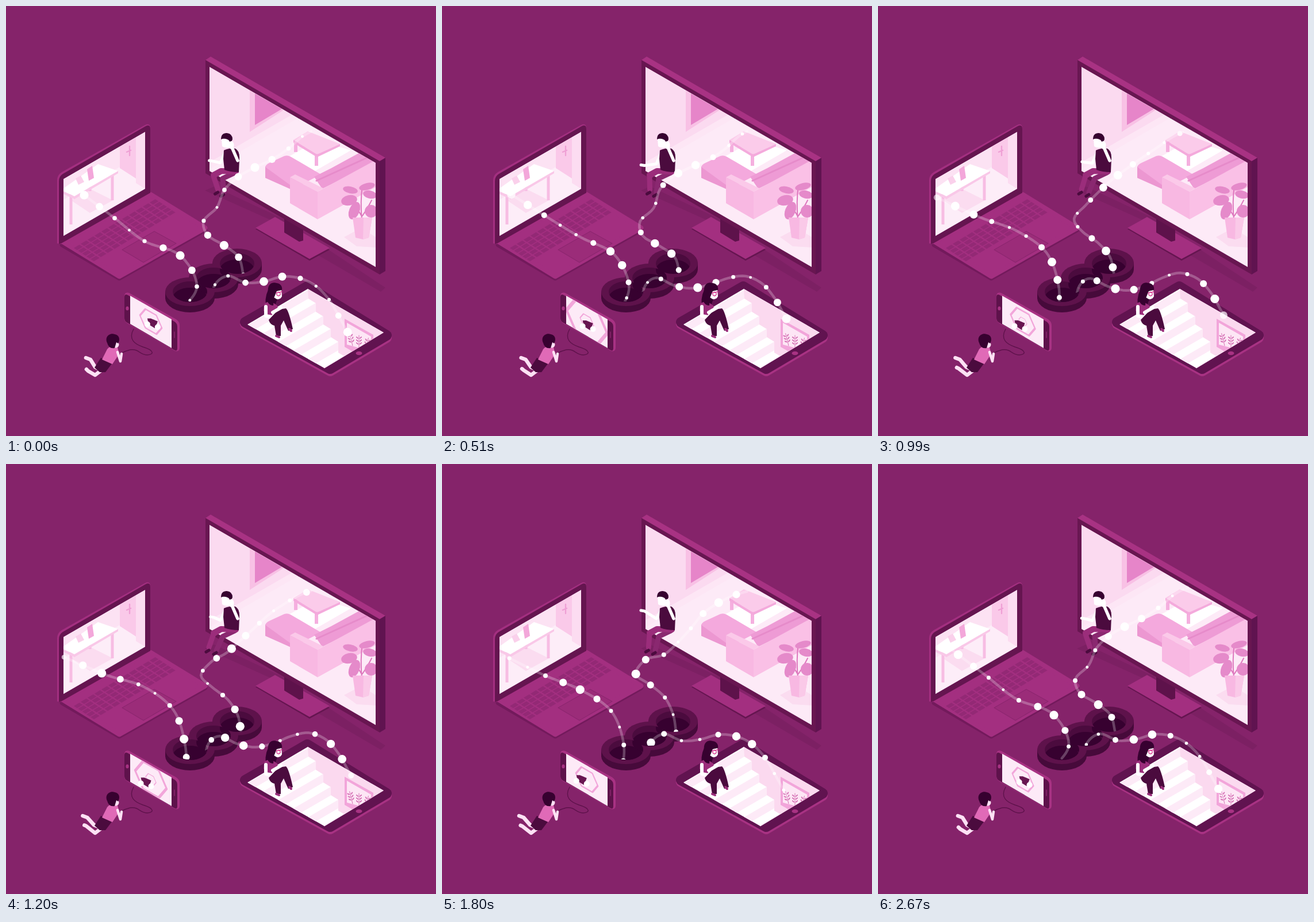
Write an HTML page that moves like this. It is 748 px wide and 748 px high and loops after 2.7 s.

```html
<!DOCTYPE html>
<html lang="en">
<head>
<meta charset="utf-8">
<title>Connected rooms</title>
<style>
html, body { margin: 0; width: 100%; height: 100%; overflow: hidden; background: #85236a; }
svg { display: block; width: 100vw; height: 100vh; }
</style>
</head>
<body>
<svg viewBox="0 0 748 748" stroke-linejoin="round" stroke-linecap="round">
<defs>
  <g id="outer"><ellipse cx="320" cy="497" rx="43" ry="25"/><ellipse cx="361" cy="473" rx="43" ry="25"/><ellipse cx="402" cy="447" rx="43" ry="25"/></g>
  <g id="inner"><ellipse cx="320" cy="497" rx="30" ry="18"/><ellipse cx="361" cy="473" rx="30" ry="18"/><ellipse cx="402" cy="448" rx="30" ry="18"/></g>
  <clipPath id="hole"><ellipse cx="320" cy="497" rx="30" ry="18"/><ellipse cx="361" cy="473" rx="30" ry="18"/><ellipse cx="402" cy="448" rx="30" ry="18"/></clipPath>
  <clipPath id="cut0"><rect width="748" height="490"/><ellipse cx="320" cy="497" rx="31" ry="17"/></clipPath>
  <clipPath id="cut1"><rect width="748" height="446"/><ellipse cx="402" cy="448" rx="31" ry="18"/></clipPath>
  <clipPath id="cut2"><rect width="748" height="474"/><rect x="386" width="362" height="748"/><ellipse cx="361" cy="473" rx="30" ry="17"/><ellipse cx="324" cy="490" rx="31" ry="12"/></clipPath>
  <clipPath id="tv"><polygon points="354,106 643,273 643,454 354,287"/></clipPath>
  <clipPath id="lap"><polygon points="100,301 242,219 242,318 100,400"/></clipPath>
  <clipPath id="pad"><polygon points="420,554 525,492 657,568 554,630"/></clipPath>
  <clipPath id="phone"><polygon points="216,504 288,545 288,595 216,553"/></clipPath>
</defs>

<rect width="748" height="748" fill="#85236a"/>
<g fill="#7c2063">
  <polygon points="346,321 362,314 490,374 482,382"/>
  <polygon points="528,402 660,490 652,497 520,420"/>
</g>

<!-- laptop -->
<polygon points="98,415 251,331 346,389 197,473" fill="#731a5c" stroke="#731a5c" stroke-width="9"/>
<polygon points="99,410 251,328 346,386 197,470" fill="#a32f80" stroke="#a32f80" stroke-width="9"/>
<g id="keys" fill="#932975"/>
<polygon points="202,424 258,392 296,413 239,446" fill="#9b2c79" stroke="#8c266f" stroke-width="1.2"/>
<path d="M89 413V303Q89 294 97 289L242 207Q251 203 251 213V325L96 414Z" fill="#a32f80"/>
<path d="M92 414V305Q92 296 99 292L243 209Q251 205 251 214V325L96 413Z" fill="#651550"/>
<g clip-path="url(#lap)">
  <rect x="95" y="210" width="150" height="195" fill="#fdedf8"/>
  <polygon points="100,301 198,244 198,280 100,337" fill="#fce2f3"/>
  <polygon points="198,244 226,228 226,300 198,282" fill="#fac9e9"/>
  <polygon points="226,228 242,219 242,318 226,308" fill="#fcdcf1"/>
  <polygon points="113,338 146,318 186,338 146,360" fill="#fbdcf0"/>
  <path d="M113 326V380M185 294V338M146 310V322" stroke="#f7bde3" stroke-width="5" stroke-linecap="butt"/>
  <polygon points="96,320 160,275 195,287 119,331" fill="#fff"/>
  <path d="M98 322L119 331 195 287V291L119 336 98 326Z" fill="#f9c8e8"/>
  <polygon points="141,284 150,278 153,299 144,304" fill="#f3a7da"/>
  <polygon points="121,300 130,295 136,306 126,311" fill="#fad0eb"/>
  <path d="M215 244V260M210 254L217 251" stroke="#efa0d5" stroke-width="2.4"/>
</g>

<!-- monitor -->
<polygon points="434,388 468,370 563,424 528,443" fill="#651550"/>
<polygon points="434,386 468,367 563,421 528,440" fill="#a32f80"/>
<polygon points="484,365 517,384 517,408 510,410 484,394" fill="#5e124b"/>
<polygon points="347,94 356,88 660,264 650,270" fill="#a83283"/>
<polygon points="650,270 660,264 660,461 650,467" fill="#601350"/>
<polygon points="347,94 650,270 650,467 347,291" fill="#681651"/>
<g clip-path="url(#tv)">
  <rect x="350" y="100" width="300" height="360" fill="#fdeaf7"/>
  <polygon points="354,106 498,189 354,272" fill="#fbdaf0"/>
  <polygon points="354,272 498,189 508,195 354,284" fill="#fde6f5"/>
  <polygon points="424,147 483,181 424,219" fill="#f8c1e5"/>
  <polygon points="433,152 480,179 433,207" fill="#e685c9"/>
  <polygon points="492,262 541,234 600,251 534,289" fill="#fff"/>
  <path d="M504 235V254M540 257V278" stroke="#f5afdf" stroke-width="6" stroke-linecap="butt"/>
  <polygon points="500,233 525,218 581,240 541,258" fill="#fbcbea"/>
  <path d="M500 233L541 258 581 240V244L541 263 500 238Z" fill="#f4aadc"/>
  <polygon points="451,279 498,303 498,320 451,299" fill="#ec97d1"/>
  <path d="M451 280Q452 276 458 273L484 261Q490 259 495 262L548 293 502 317Z" fill="#f4a9dd"/>
  <polygon points="536,297 566,282 632,246 643,252 643,272 550,318" fill="#ee9bd5"/>
  <path d="M540 304L643 257" stroke="#e68bca" stroke-width="3"/>
  <polygon points="494,298 503,293 552,317 542,323" fill="#fbc9e9"/>
  <polygon points="542,323 643,268 643,315 542,371" fill="#fac0e6"/>
  <polygon points="494,298 542,323 542,371 494,343" fill="#f8b8e2"/>
  <polygon points="588,402 618,386 643,402 643,420 610,418" fill="#fbdcf0"/>
  <path d="M619 372Q616 340 620 312M619 366Q610 350 600 338M620 365Q630 350 636 338" stroke="#de78be" stroke-width="2" fill="none"/>
  <g fill="#e58aca">
    <ellipse cx="628" cy="314" rx="14" ry="6" transform="rotate(-14 628 314)"/>
    <ellipse cx="599" cy="320" rx="13" ry="6" transform="rotate(12 599 320)"/>
    <ellipse cx="597" cy="338" rx="14" ry="9" transform="rotate(-12 597 338)"/>
    <ellipse cx="633" cy="328" rx="12" ry="7" transform="rotate(12 633 328)"/>
    <ellipse cx="606" cy="356" rx="9" ry="16" transform="rotate(22 606 356)"/>
    <ellipse cx="635" cy="357" rx="11" ry="11"/>
  </g>
  <polygon points="603,368 637,368 631,403 621,406 608,403" fill="#f8b8e2"/>
  <polygon points="622,368 637,368 631,403 621,406" fill="#fac9e8"/>
</g>

<!-- linked holes -->
<g fill="#470a3b"><use href="#outer" y="11"/><use href="#outer" y="8"/><use href="#outer" y="5"/><use href="#outer" y="2"/></g>
<use href="#outer" fill="#5e124b"/>
<use href="#inner" fill="#4b0b3e"/>
<g clip-path="url(#hole)"><use href="#inner" y="11" fill="#370130"/></g>

<!-- tablet -->
<polygon points="416,553 524,490 662,577 564,635" fill="#a83283" stroke="#a83283" stroke-width="18"/>
<polygon points="416,550 524,488 662,573 564,631" fill="#611350" stroke="#611350" stroke-width="18"/>
<g clip-path="url(#pad)">
  <rect x="410" y="485" width="255" height="150" fill="#fff"/>
  <g id="steps" fill="#fdeaf7"/>
  <polygon points="525,492 657,568 590,610 578,603 578,584 565,576 565,562 552,554 552,540 539,532 539,517 526,509" fill="#fbd9ef"/>
  <polygon points="589,544 639,572 639,597 612,606 589,593" fill="#f2a5da"/>
  <polygon points="593,551 635,575 635,600 593,589" fill="#fde6f5"/>
  <g id="sprigs" fill="#d673b6" stroke="#d673b6"/>
</g>
<ellipse cx="614" cy="604" rx="5.5" ry="3.3" fill="#a83283"/>

<!-- phone -->
<path d="M206 505Q206 497 214 499L296 545Q302 549 302 556V594Q302 602 294 600L211 552Q206 549 206 543Z" fill="#a83283"/>
<path d="M206 507Q206 500 212 503L293 549Q298 552 298 558V595Q298 602 292 598L211 551Q206 548 206 543Z" fill="#5e124b"/>
<ellipse cx="211" cy="526" rx="2.6" ry="3.6" fill="#a83283"/>
<path d="M293 567V577" stroke="#8c266f" stroke-width="1.5"/>
<g clip-path="url(#phone)">
  <rect x="210" y="500" width="82" height="100" fill="#fdeaf7"/>
  <g id="rings" transform="matrix(1 .57 0 1 252 549)" fill="none" stroke="#f2a6da"/>
  <g id="player">
    <polygon points="-9,-6 -3,-6 2,-4 9,-1 7,5 4,11 -4,6 -7,3" fill="#681651"/>
    <circle cx="-9" cy="4" r="5" fill="#fff"/><circle cx="9" cy="9" r="5" fill="#fff"/>
  </g>
</g>

<!-- child -->
<path d="M222 562C212 580 224 588 238 593C258 599 258 606 246 607C232 607 232 596 216 598Q208 600 200 604" stroke="#5e124b" stroke-width="1.4" fill="none"/>
<g fill="none" stroke="#fde1f4" stroke-width="6.5"><path id="kickB"/><path id="kickA"/></g>
<polygon points="165,612 185,621 173,637 163,637 154,629" fill="#4b0b3e"/>
<path d="M176 597Q184 588 194 594L197 605 185 623 167 615Z" fill="#e06ab7"/>
<path d="M194 602L199 618 201 605" stroke="#fde1f4" stroke-width="4.5" fill="none"/>
<circle cx="191" cy="589" r="5.5" fill="#fde1f4"/>
<path d="M176 586C171 575 181 568 189 571C197 572 199 580 195 587L192 585 189 595Q179 597 176 586Z" fill="#370130"/>

<!-- seated man -->
<g fill="none" stroke-width="9"><path id="legB" stroke="#8a2870"/><path id="legA" stroke="#9b2d7b"/></g>
<g fill="none" stroke="#4b0b3e" stroke-width="5"><path id="footB"/><path id="footA"/></g>
<path d="M400 288L374 287 361 294" stroke="#9b2d7b" stroke-width="10" fill="none"/>
<path id="arm" fill="none" stroke="#fff" stroke-width="5"/>
<path d="M379 251Q390 246 399 248Q407 253 406 266L405 289Q390 289 380 285L378 266Z" fill="#4b0b3e"/>
<path d="M403 269L393 246" stroke="#fff" stroke-width="5.5"/>
<path d="M375 231L388 230 389 246Q381 248 376 244Z" fill="#fff"/>
<path d="M374 232Q374 221 384 221Q394 222 394 232L391 238 387 233Q380 229 374 232Z" fill="#370130"/>
<ellipse cx="392" cy="242" rx="4.5" ry="7" fill="#fff"/>

<g id="strands"/>

<!-- seated girl -->
<path d="M456 494Q450 507 452 519L466 526 472 510Z" fill="#370130"/>
<path d="M449 519Q453 513 463 515L472 521 474 533 458 543 448 530Z" fill="#9b2d7b"/>
<path d="M452 523L452 539 463 541 478 526" stroke="#fff" stroke-width="6" fill="none"/>
<path d="M457 546L474 528 487 526Q492 530 499 562L491 565 483 547 478 556 478 574 470 574 467 556Q459 554 457 546Z" fill="#4b0b3e"/>
<path d="M470 574L475 576M493 562L496 565" stroke="#9b2d7b" stroke-width="4"/>
<path d="M464 533L478 525" stroke="#fff" stroke-width="6"/>
<path d="M467 492L479 493 480 505Q477 511 471 510L466 507Z" fill="#fff"/>
<path d="M456 498C454 484 463 479 471 482C479 483 481 490 480 494L471 496 466 508 465 521Q457 521 454 512Z" fill="#370130"/>
<path d="M470 499L480 497M471 502a3 3 0 1 0 6-2a3 3 0 1 0-6 2" stroke="#d93a93" stroke-width="1.4" fill="none"/>
</svg>

<script>
const LOOP = 2700, HOPS = 12;
const $ = id => document.getElementById(id);
const set = (e, attrs) => { for (const k in attrs) e.setAttribute(k, attrs[k]); };
const add = (parent, tag, attrs) => {
  const e = document.createElementNS('http://www.w3.org/2000/svg', tag);
  set(e, attrs);
  return parent.appendChild(e);
};
// cosine over the loop, at its peak when u = peak
const wave = (u, peak, n = 1) => Math.cos(2 * Math.PI * n * (u - peak));
const spline = (a, b, c, d, w) =>
  b + w / 2 * (c - a + w * (2 * a - 5 * b + 4 * c - d + w * (3 * (b - c) + d - a)));
const points = text => text.split(' ').map(p => p.split(',').map(Number));

// Each strand sways between two curves. Places on it are counted in bead gaps from
// the hole: "first" is the place of the first curve point, "step" the gap between points.
const strands = [
  { first: -2, step: 2, end: 8.8, crest: 2, peak: 0,
    from: '300,535 332,488 303,434 241,409 189,369 136,329',
    to: '314,553 311,489 291,428 240,387 177,368 111,341' },
  { first: -1, step: 1, end: 11, crest: 1, peak: 0.12,
    from: '414,468 405,437 378,418 349,401 345,375 369,352 379,318 403,295 433,280 464,268 493,249 516,227 541,212',
    to: '407,466 402,436 388,406 363,384 337,365 354,340 386,332 411,310 433,286 454,260 481,241 512,227 543,219' },
  { first: -1, step: 1, end: 9.9, crest: 3.4, peak: 1 / 3,
    from: '343,517 350,487 369,474 400,488 432,495 464,488 494,473 525,464 556,474 579,498 595,526',
    to: '362,516 368,484 392,468 422,479 454,474 486,465 518,474 544,495 564,523 578,552 594,581' }
];
strands.forEach((s, i) => {
  const g = add($('strands'), 'g', { 'clip-path': `url(#cut${i})` });
  s.from = points(s.from);
  s.to = points(s.to);
  s.line = add(g, 'path', { fill: 'none', stroke: '#fff', 'stroke-opacity': 0.25, 'stroke-width': 4.5 });
  s.beads = Array.from({ length: 13 }, () => add(g, 'circle', { fill: '#fff' }));
});

function along(curve, x) {
  const last = curve.length - 1;
  const j = Math.min(Math.max(Math.floor(x), 0), last - 1), w = x - j;
  return [0, 1].map(c => {
    const b = curve[j][c], d = curve[j + 1][c];
    if (w > 1) return b + (d - b) * w;
    const a = j ? curve[j - 1][c] : 2 * b - d;
    const e = j + 1 < last ? curve[j + 2][c] : 2 * d - b;
    return spline(a, b, d, e, w);
  });
}

function drawStrand({ first, step, end, crest, peak, from, to, line, beads }, u) {
  const mix = (1 - wave(u, peak)) / 2;
  const curve = from.map((p, i) => p.map((v, c) => v + (to[i][c] - v) * mix));
  const spot = s => along(curve, (s - first) / step);

  let d = '';
  for (let s = -1; s <= end - 0.4; s += 0.2) d += (d ? 'L' : 'M') + spot(s).map(v => v.toFixed(1));
  set(line, { d });

  // the swell of bead sizes runs back towards the hole
  const top = crest + 0.45 + 0.85 * wave(u, 0.35) - 6 * u;
  beads.forEach((bead, n) => {
    const s = n - 1 + HOPS * u % 1;
    const [cx, cy] = spot(s);
    const r = 5 + 2.6 * Math.cos((s - top) * Math.PI / 3);
    set(bead, { cx, cy, r, opacity: Math.min(1, Math.max(0, (end - s) * 1.4)) });
  });
}

for (let r = 0; r < 5; r++)
  for (let c = 0; c < 12; c++) {
    const x = 118 + 12 * c + 7.3 * r, y = 421 - 7.2 * c + 4.8 * r;
    add($('keys'), 'path', { d: `M${x} ${y}l9.6 -5.8 5.8 3.8 -9.6 5.8z` });
  }
for (let i = 0; i < 6; i++)
  add($('steps'), 'path', { d: `M${526 + 13 * i} ${494 + 22.5 * i}v15l-140 81v-15z` });
for (let i = 0; i < 3; i++) {
  const g = add($('sprigs'), 'g', { transform: `translate(${602 + 12 * i} ${587 + 4 * i}) rotate(${14 * (i - 1)})` });
  add(g, 'path', { d: 'M0 4V-18', 'stroke-width': 1 });
  for (let k = 0; k < 6; k++) {
    const side = k % 2 * 2 - 1, y = -5 * (k >> 1) - 4;
    add(g, 'ellipse', { cx: 3 * side, cy: y, rx: 2.6, ry: 1.1, stroke: 'none', transform: `rotate(${-40 * side} ${3 * side} ${y})` });
  }
}

const hex = [0, 1, 2, 3, 4, 5].map(k => k * Math.PI / 3);
const rings = [0, 1, 2].map(() => add($('rings'), 'polygon', {}));

function draw(u) {
  strands.forEach(s => drawStrand(s, u));

  const swing = wave(u, -0.05);
  const a = 360 + 8 * swing, b = 371.5 + 6.5 * swing;
  set($('legA'), { d: `M374 288L361 296 ${a + 1} 319` });
  set($('legB'), { d: `M398 290L377 300 ${b + 1} 324` });
  set($('footA'), { d: `M${a + 1} 324L${a - 4} 327` });
  set($('footB'), { d: `M${b + 1} 328L${b - 4} 331` });
  const hx = 351 + 5 * wave(u, 0.42, 2), hy = 265.5 + 11 * wave(u, 0.2);
  set($('arm'), { d: `M381 255L373 ${275 - (278 - hy) * 0.25}L${hx + 6} ${hy + 1}L${hx} ${hy}` });

  const kick = wave(u, 0.03);
  set($('kickA'), { d: `M168 632L155 642 ${141 + 2 * kick} ${632 + 3 * kick}L${138 + 2 * kick} ${630 + 2 * kick}` });
  set($('kickB'), { d: `M163 632L${154 + kick} 628L${144 + 3 * kick} 615L${136 + 3 * kick} 612` });

  rings.forEach((ring, i) => {
    const r = 7 * Math.pow(9, ((3 * u + 0.907) % 1 + i) / 2);
    set(ring, {
      points: hex.map(h => [r * Math.cos(h), r * Math.sin(h)].map(v => v.toFixed(1))).join(' '),
      'stroke-width': r * 0.14
    });
  });
  set($('player'), { transform: `translate(${248.5 + 7 * wave(u, 0.07)} ${550 + 3.5 * wave(u, 0.27)})` });
}

let start;
function tick(now) {
  start ??= now;
  draw((now - start) % LOOP / LOOP);
  requestAnimationFrame(tick);
}
draw(0);
requestAnimationFrame(tick);
</script>
</body>
</html>
```
